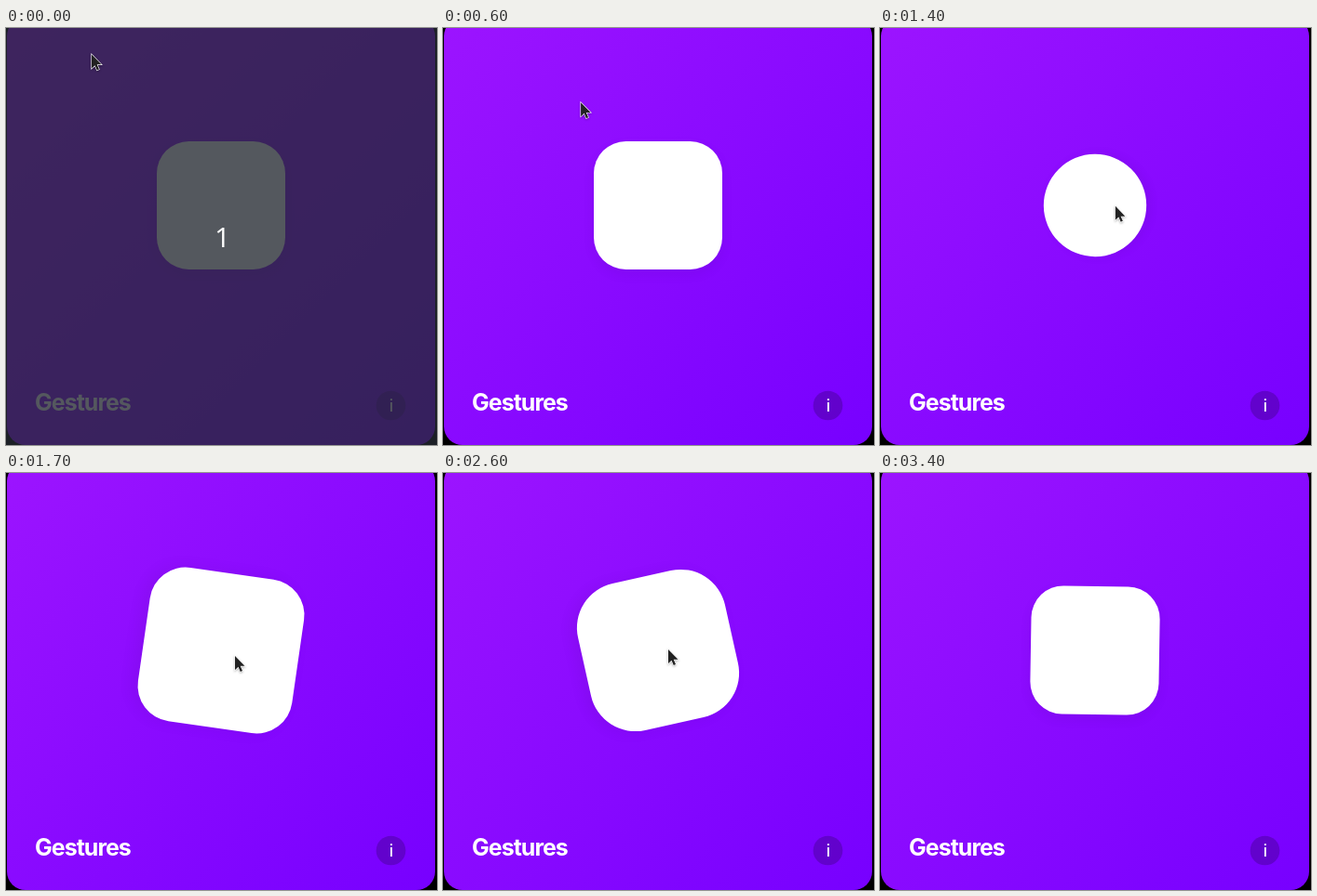
These frames come from a looping animation (463 by 449 pixels, 3600 ms). An HTML page:

```html
<!DOCTYPE html>
<html lang="en">
<head>
<meta charset="utf-8">
<title>Gestures</title>
<style>
  html, body { margin: 0; width: 100%; height: 100%; overflow: hidden; background: #000; }
  #stage { position: relative; width: 463px; height: 449px; overflow: hidden; background: #000; }
  #stage > * { position: absolute; }
  #card {
    left: 1px; top: -11px; width: 460px; height: 460px; border-radius: 20px;
    background: linear-gradient(135deg, #9c14ff, #70f);
  }
  #box {
    left: 162px; top: 122px; width: 138px; height: 138px; background: #fff;
    box-shadow: 0 5px 14px rgba(0, 0, 0, .06);
  }
  svg { left: 0; top: 0; }
  text { font-family: Inter, sans-serif; fill: #fff; }
  .title { font-size: 25px; font-weight: 700; letter-spacing: -1px; }
  .info { font-size: 17px; font-weight: 500; text-anchor: middle; }
  .count { font: 30px "Open Sans", sans-serif; text-anchor: middle; }
  #cursor { filter: drop-shadow(0 1px 1px rgba(0, 0, 0, .3)); }
</style>
</head>
<body>
<div id="stage">
  <div id="card"></div>
  <div id="box"></div>
  <svg width="463" height="449">
    <text class="title" x="31" y="412">Gestures</text>
    <circle cx="413.5" cy="406.5" r="15.8" fill="#000" fill-opacity=".2"/>
    <text class="info" x="413.8" y="413.3">i</text>
    <g id="intro">
      <rect width="463" height="449" fill="#252931" fill-opacity=".78"/>
      <text class="count" x="232.5" y="235.5">1</text>
    </g>
    <path id="cursor" d="M0 0V15L3.5 11.7L5.8 17L8 16L5.7 10.8H10.5Z"
      fill="#222" stroke="#fff" stroke-width="1.2" paint-order="stroke"/>
  </svg>
</div>
<script>
const LOOP = 3600, STEP = 100;
const $ = id => document.getElementById(id);

const rest = { angle: 0, scale: 1, radius: 25 };
const hover = { angle: 90, scale: 1.2, radius: 25 };
const tap = { angle: -90, scale: 0.8, radius: 100 };

// shown from, spring began, pose
const poses = [
  [0, -1000, rest],
  [730, 730, hover],
  [950, 875, tap],
  [1460, 1460, hover],
  [1900, 1900, tap],
  [2495, 2495, hover],
  [3020, 3020, rest]
];

// time, x, y, eased
const path = [
  [0, 92, 28.5], [350, 92, 28.5], [1000, 262, 185, true], [1700, 246, 197],
  [2200, 244, 193], [2600, 242, 190], [2790, 241, 189], [3200, 109, 38, true],
  [LOOP, 109, 38]
];

// Distance left to travel for an underdamped spring released at t = 0
function spring(t, stiffness, damping) {
  const decay = damping / 2, w = Math.sqrt(stiffness - decay * decay);
  return Math.exp(-decay * t) * (Math.cos(w * t) + decay / w * Math.sin(w * t));
}

function poseAt(t) {
  const i = poses.findLastIndex(p => t >= p[0]);
  const [, began, to] = poses[i];
  const from = i ? poses[i - 1][2] : rest;
  const age = (t - began) / 1000;
  const turn = spring(age, 500, 25), grow = spring(age, 580, 30);
  const mix = (key, left) => to[key] + (from[key] - to[key]) * left;
  return {
    angle: mix("angle", turn),
    scale: mix("scale", grow),
    radius: Math.min(50, mix("radius", grow))
  };
}

function cursorAt(t) {
  const i = path.findIndex(p => t < p[0]);
  const [t0, x0, y0] = path[i - 1], [t1, x1, y1, eased] = path[i];
  let k = (t - t0) / (t1 - t0);
  if (eased) k = k * k * (3 - 2 * k);
  return [x0 + (x1 - x0) * k, y0 + (y1 - y0) * k];
}

function draw(time) {
  const t = Math.floor((time % LOOP) / STEP) * STEP;
  const { angle, scale, radius } = poseAt(t);
  $("box").style.transform = `rotate(${angle}deg) scale(${scale})`;
  $("box").style.borderRadius = radius + "%";
  $("cursor").setAttribute("transform", `translate(${cursorAt(t)})`);
  $("cursor").style.display = t < 3300 ? "" : "none";
  $("intro").style.display = t < 200 ? "" : "none";
}

const start = performance.now();
function tick() {
  draw(performance.now() - start);
  requestAnimationFrame(tick);
}
tick();
</script>
</body>
</html>
```
